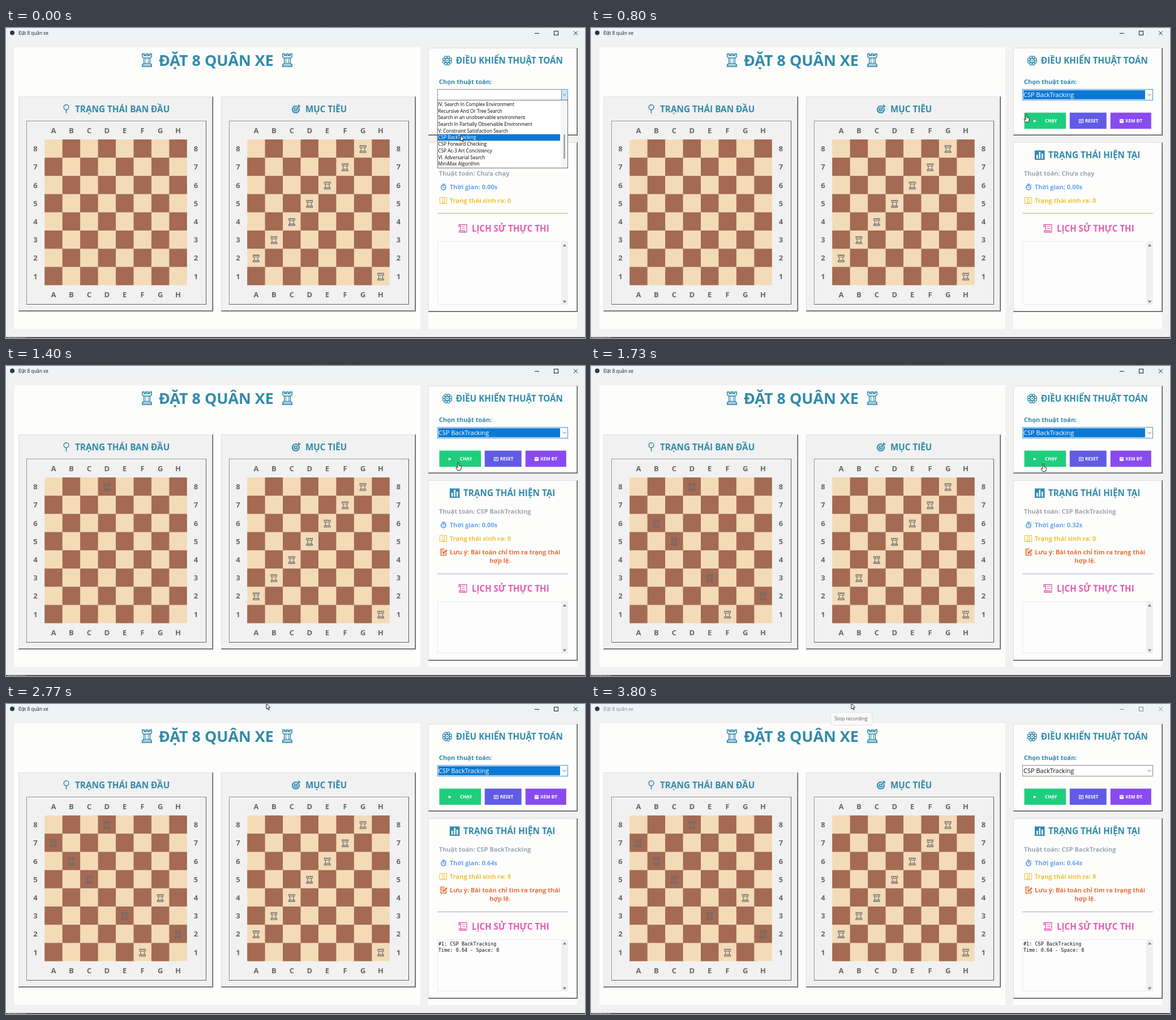
An HTML page with a canvas that plays this animation: 1023x548 px, repeating every 3830 ms.

```html
<!DOCTYPE html>
<html lang="vi">
<head>
<meta charset="utf-8">
<title>Đặt 8 quân xe</title>
<style>
  html, body { margin: 0; width: 100%; height: 100%; overflow: hidden; background: #f1f1f1; }
  canvas { display: block; }
</style>
</head>
<body>
<canvas id="stage" width="1023" height="548"></canvas>
<script>
const g = document.getElementById('stage').getContext('2d');
const LOOP = 3830;
const SANS = '"Open Sans", "Noto Sans", sans-serif';
const MONO = '"DejaVu Sans Mono", monospace';
const TEAL = '#318aac', GRAY = '#f1f1f1', WHITE = '#fdfdfc', PINK = '#e45cb0';

// Moments of the story, in ms
const PICK = 130, RUN = 1250, STEP = 80, DONE = RUN + 9 * STEP, BLUR = 3770;

// Column and row (from the top) in order of placing
const PLACED = [[3, 0], [1, 2], [2, 3], [4, 5], [7, 6], [5, 7], [0, 1], [6, 4]];
const GOAL = [[6, 0], [5, 1], [4, 2], [3, 3], [2, 4], [1, 5], [0, 6], [7, 7]];

// Pointer path: time, x, y
const PATH = [
  [0, 803, 190], [150, 803, 190], [430, 689, 125], [560, 688, 126], [900, 790, 160],
  [1100, 799, 167], [1250, 799, 167], [1500, 799, 173], [1950, 799, 173],
  [2270, 612, 66], [2620, 460, -1], [LOOP, 460, -1]
];

const OPTIONS = [
  'IV. Search In Complex Environment', 'Recursive And Or Tree Search',
  'Search in an unobservable environment', 'Search In Partially Observable Environment',
  'V. Constraint Satisfaction Search', 'CSP BackTracking', 'CSP Forward Checking',
  'CSP Ac-3 Art Concistency', 'VI. Adversarial Search', 'MiniMax Algorithm'
];

function rect(x, y, w, h, color) {
  g.fillStyle = color;
  g.fillRect(x, y, w, h);
}

function frame(x, y, w, h, color) {
  g.strokeStyle = color;
  g.lineWidth = 1;
  g.strokeRect(x + .5, y + .5, w - 1, h - 1);
}

// y is the middle of the capitals
function text(s, x, y, size, color, { weight = 700, align = 'left', font = SANS } = {}) {
  g.font = `${weight} ${size}px ${font}`;
  g.textAlign = align;
  g.fillStyle = color;
  g.fillText(s, x, y + size * .357);
}

function poly(points, close = true) {
  g.beginPath();
  points.forEach(([x, y]) => g.lineTo(x, y));
  if (close) g.closePath();
}

function line(points, color, width = 1) {
  poly(points, false);
  g.strokeStyle = color;
  g.lineWidth = width;
  g.stroke();
}

function ring(x, y, r, color, width) {
  g.beginPath();
  g.arc(x, y, r, 0, 7);
  g.strokeStyle = color;
  g.lineWidth = width;
  g.stroke();
}

function dot(x, y, r, color) {
  g.beginPath();
  g.arc(x, y, r, 0, 7);
  g.fillStyle = color;
  g.fill();
}

function triangle(x, y, r, dir, color) {
  poly([[x - r, y + r * .7 * dir], [x + r, y + r * .7 * dir], [x, y - r * .7 * dir]]);
  g.fillStyle = color;
  g.fill();
}

function raised(x, y, w, h, fill) {
  rect(x, y, w, h, fill);
  rect(x, y, w, 1, '#dedede');
  rect(x, y, 1, h, '#dedede');
  rect(x + w - 2, y + 1, 1, h - 1, '#a0a0a0');
  rect(x + 1, y + h - 2, w - 1, 1, '#a0a0a0');
  rect(x + w - 1, y, 1, h, '#505050');
  rect(x, y + h - 1, w, 1, '#505050');
}

function rook(x, y, scaleX, scaleY, color, width) {
  const half = [[1.2, -6.2], [1.2, -4.8], [3, -4.8], [3, -6.2], [5.3, -6.2], [5.3, -3.4],
    [3.4, -2], [3.4, 3], [5.3, 4.3], [5.3, 6.2]];
  const mirror = half.map(([a, b]) => [-a, b]).reverse();
  g.save();
  g.translate(x, y);
  g.scale(scaleX, scaleY);
  poly([...half, ...mirror]);
  g.strokeStyle = color;
  g.lineWidth = width;
  g.stroke();
  line([[-3.8, -2.2], [3.8, -2.2]], color, width * .9);
  line([[-3.8, 3.2], [3.8, 3.2]], color, width * .9);
  line([[-5, 4.8], [5, 4.8]], color, width * .6);
  g.restore();
}

function titleRook(x) {
  rook(x, 57, 1.55, 1.8, TEAL, 1);
  for (const side of [-1, 1]) line([[x + side * 2.3, 53], [x + side * 2.3, 63]], TEAL, 1);
  line([[x - 6, 49], [x + 6, 49]], TEAL, 1.2);
}

function board(x, rooks) {
  raised(x, 121, 344, 380, GRAY);
  frame(x + 15, 165, 317, 325, '#ffffff');
  frame(x + 14, 164, 318, 325, '#8c8c8c');
  rect(x + 331, 164, 1, 325, '#5a5a5a');
  rect(x + 14, 488, 318, 1, '#5a5a5a');
  const left = x + 46.2, top = 197, cw = 31.45, ch = 32.2;
  rect(left, top, cw * 8, ch * 8, '#f3dbb8');
  for (let r = 0; r < 8; r++) {
    for (let c = 1 - r % 2; c < 8; c += 2)
      rect(left + cw * c, top + ch * r, cw, ch, '#a46a54');
    const center = { align: 'center' };
    const mid = top + ch * (r + .5) + .5;
    text(8 - r, x + 30, mid, 13, '#666', center);
    text(8 - r, x + 313.5, mid, 13, '#666', center);
    for (const ly of [181.5, 471])
      text('ABCDEFGH'[r], left + cw * (r + .5), ly, 13, '#666', center);
  }
  for (const [c, r] of rooks)
    rook(left + cw * (c + .5), top + ch * (r + .5) + 1, 1, 1, '#6a6a6a', 1.1);
}

function titleBar(active) {
  const sky = g.createLinearGradient(0, 0, 1023, 0);
  sky.addColorStop(0, '#edf4f9');
  sky.addColorStop(1, '#e9f4f5');
  rect(0, 0, 1023, 20, sky);
  const ink = active ? '#1a1a1a' : '#858585';
  dot(11, 8.5, 4, '#2b3a48');
  text('Đặt 8 quân xe', 22, 9, 8.2, ink, { weight: 400 });
  line([[934, 9.5], [942, 9.5]], ink);
  frame(968, 5, 8, 8, ink);
  line([[1003, 5.5], [1010, 12.5]], ink);
  line([[1010, 5.5], [1003, 12.5]], ink);
}

function pinIcon() {
  ring(106.5, 140, 4.4, TEAL, 1.5);
  line([[106.5, 144.5], [106.5, 151]], TEAL, 1.6);
  line([[104.5, 138.8], [106, 137.4]], TEAL, 1);
}

function targetIcon() {
  ring(512, 144, 6, TEAL, 2.2);
  ring(512, 144, 2.6, TEAL, 2);
  line([[512, 144], [520, 136]], GRAY, 3.2);
  line([[512, 144], [519, 137]], TEAL, 1.8);
  line([[516.5, 140], [517, 136.5], [520, 139.5]], TEAL, 1.6);
}

function flowerIcon() {
  for (let i = 0; i < 8; i++) {
    const a = i * Math.PI / 4 + Math.PI / 8;
    ring(779.5 + 6.2 * Math.cos(a), 57.5 + 6.2 * Math.sin(a), 2.2, TEAL, 1.3);
  }
  ring(779.5, 57.5, 3.6, TEAL, 1.4);
  dot(779.5, 57.5, 1.2, TEAL);
}

function chartIcon() {
  rect(784, 216.5, 17.5, 16.5, TEAL);
  rect(787, 224, 2.5, 7, WHITE);
  rect(791.5, 219, 2.5, 12, WHITE);
  rect(796, 222, 2.5, 9, WHITE);
}

function watchIcon() {
  const c = '#66a3ec';
  ring(773, 282, 4, c, 2);
  line([[771, 276], [775, 276]], c, 1.8);
  line([[776.5, 278], [777.8, 276.7]], c, 1.6);
  line([[773, 279.5], [773, 282.5], [775, 282.5]], c, 1.2);
}

function digitsIcon() {
  const c = '#eec235';
  frame(766, 299, 13, 12, c);
  const o = { align: 'center' };
  text('12', 772.5, 302.6, 5.8, c, o);
  text('34', 772.5, 307.7, 5.8, c, o);
}

function memoIcon() {
  const c = '#e8713a';
  line([[775, 323.5], [768.5, 323.5], [768.5, 334.5], [777.5, 334.5], [777.5, 330]], c, 1.7);
  line([[770.5, 326.5], [774, 326.5]], c, 1.3);
  line([[770.5, 329], [773, 329]], c, 1.3);
  line([[772, 332], [779, 325]], c, 2.8);
}

function scrollIcon(y) {
  line([[803, y + 4], [803, y - 7], [814, y - 7], [814, y + 6]], PINK, 1.3);
  line([[803, y - 7], [800, y - 7], [800, y - 3.5], [803, y - 3.5]], PINK, 1.3);
  line([[814, y + 6.5], [801, y + 6.5], [801, y + 4], [811, y + 4], [811, y + 6.5]], PINK, 1.3);
  line([[805.5, y - 3.5], [811.5, y - 3.5]], PINK, 1);
  line([[805.5, y], [811.5, y]], PINK, 1);
}

function combo(open, active) {
  rect(762, 108, 231, 20, '#fff');
  frame(762, 108, 231, 20, active && !open ? '#3c94da' : '#8a8a8a');
  if (open) {
    rect(981, 108, 12, 20, '#cfe6f8');
    frame(981, 108, 12, 20, '#4d9ddb');
  } else {
    if (active) rect(764, 110, 215, 16, '#0b79d3');
    text('CSP BackTracking', 764, 118.5, 11, active ? '#fff' : '#111', { weight: 400 });
  }
  line([[983.5, 116.5], [986.5, 119.5], [989.5, 116.5]], '#666');
}

function dropdown() {
  rect(762, 128, 231, 120, '#fff');
  OPTIONS.forEach((name, i) => {
    const y = 135 + i * 11.7;
    const picked = i === 5;
    if (picked) rect(763, 187.7, 216, 11.6, '#0b79d3');
    text(name, 763.5, y, 8.28, picked ? '#fff' : '#000', { weight: 400 });
  });
  rect(980, 129, 12, 118, '#f5f5f5');
  rect(985.5, 188, 2, 43, '#858585');
  frame(762, 127, 231, 121, '#6e6e6e');
}

function buttons() {
  rect(765.6, 149.6, 73.6, 28.6, '#1fcd7d');
  rect(845.8, 149.6, 65, 28.6, '#625be5');
  rect(917.8, 149.6, 72, 28.6, '#894bef');
  poly([[782, 161.8], [782, 167], [787, 164.4]]);
  g.fillStyle = '#fff';
  g.fill();
  text('CHẠY', 802, 164.3, 8.1, '#fff');
  frame(862, 161, 8, 7, '#fff');
  rect(864, 163, 4, 1, '#fff');
  rect(864, 165, 3, 1, '#fff');
  text('RESET', 873, 164.3, 8, '#fff');
  rect(934, 161, 7, 7, '#fff');
  line([[935, 162.5], [937.5, 164.5], [940, 162.5]], '#894bef');
  text('XEM ĐT', 944, 164.3, 8.1, '#fff');
}

function controls(open, active) {
  raised(746, 35, 264, 155, WHITE);
  flowerIcon();
  text('ĐIỀU KHIỂN THUẬT TOÁN', 795, 58, 15.2, TEAL);
  text('Chọn thuật toán:', 765, 95.5, 11, TEAL);
  combo(open, active);
  buttons();
}

function status(t) {
  const running = t >= RUN, done = t >= DONE;
  const steps = Math.max(0, Math.floor((t - RUN) / STEP) - 2);
  const secs = done ? '0.64' : (steps * .08).toFixed(2);
  const shift = running ? 39 : 0;

  raised(746, 202, 264, running ? 319 : 300, WHITE);
  chartIcon();
  text('TRẠNG THÁI HIỆN TẠI', 808, 225, 15.3, TEAL);
  text('Thuật toán: ' + (running ? 'CSP BackTracking' : 'Chưa chạy'), 765, 257, 11, '#9ca6b2');
  watchIcon();
  text(`Thời gian: ${secs}s`, 784, 281, 11, '#66a3ec');
  digitsIcon();
  text('Trạng thái sinh ra: ' + (done ? 8 : 0), 784, 305, 11, '#eec235');
  if (running) {
    memoIcon();
    text('Lưu ý: Bài toán chỉ tìm ra trạng thái', 784, 329, 11, '#e8713a');
    text('hợp lệ.', 873, 344.5, 11, '#e8713a', { align: 'center' });
  }
  rect(762, running ? 367 : 327, 231, 1, running ? '#a9a5cc' : '#b3ab74');
  scrollIcon(354.5 + shift);
  text('LỊCH SỬ THỰC THI', 823, 354.7 + shift, 15.1, PINK);
  history(377 + shift, running ? 508 : 489, done);
}

function history(top, bottom, done) {
  rect(762, top, 231, bottom - top, '#fdfdfe');
  frame(762, top, 231, bottom - top, '#e9e9f1');
  rect(981, top, 12, bottom - top, '#f0f0f0');
  triangle(987, top + 7, 3.3, 1, '#858585');
  triangle(987, bottom - 5, 3.3, -1, '#858585');
  if (!done) return;
  const style = { weight: 400, font: MONO };
  text('#1: CSP BackTracking', 764, top + 7.5, 8.5, '#111', style);
  text('Time: 0.64 - Space: 8', 764, top + 18.5, 8.5, '#111', style);
}

function pointer(t) {
  const i = PATH.findIndex(p => p[0] > t);
  const [t0, x0, y0] = PATH[i - 1], [t1, x1, y1] = PATH[i];
  const k = (t - t0) / (t1 - t0), e = k * k * (3 - 2 * k);
  const x = x0 + (x1 - x0) * e, y = y0 + (y1 - y0) * e;
  const hand = t > PICK && x > 766 && x < 839 && y > 150 && y < 178;
  g.save();
  g.translate(x, y);
  if (hand) {
    poly([[-1, 0], [1, 0], [1.2, 5], [5, 6], [5.5, 9], [4, 13.5], [-1, 13.5], [-4, 9], [-3, 7.5], [-1, 9]]);
  } else {
    poly([[0, 0], [0, 10], [2.2, 8], [3.8, 11.4], [5.2, 10.8], [3.7, 7.4], [6.6, 7.2]]);
  }
  g.fillStyle = '#fff';
  g.fill();
  g.strokeStyle = '#222';
  g.lineWidth = 1;
  g.lineJoin = 'round';
  g.stroke();
  g.restore();
}

function tooltip() {
  g.beginPath();
  g.roundRect(423.5, 14.5, 73, 23, 3);
  g.fillStyle = '#f9f9f9';
  g.fill();
  g.strokeStyle = '#e0e0e0';
  g.lineWidth = 1;
  g.stroke();
  text('Stop recording', 430, 26, 8.6, '#606060', { weight: 400 });
}

// Window's lower edge, with the tops of a caption hidden below it
function bottomEdge() {
  rect(0, 546, 1023, 1, '#8a8a8a');
  rect(0, 547, 1023, 1, '#2a2a2a');
  text('Terminal', 2, 548, 8, '#d8d8d8', { weight: 400 });
}

function draw(t) {
  const open = t < PICK, active = t < BLUR;
  const count = Math.max(0, Math.min(8, Math.floor((t - RUN) / STEP)));

  rect(0, 0, 1023, 548, GRAY);
  titleBar(active);
  rect(15, 34, 717, 498, WHITE);
  rect(746, 35, 263, 497, WHITE);
  rect(746, 190, 263, 12, GRAY);

  titleRook(249);
  text('ĐẶT 8 QUÂN XE', 270, 57.5, 26.9, TEAL);
  titleRook(497);

  board(22, PLACED.slice(0, count));
  board(380, GOAL);
  pinIcon();
  text('TRẠNG THÁI BAN ĐẦU', 122, 143.5, 15.3, TEAL);
  targetIcon();
  text('MỤC TIÊU', 529, 143.5, 15.2, TEAL);

  controls(open, active);
  status(t);
  if (open) dropdown();
  bottomEdge();
  if (!active) tooltip();
  pointer(t);
}

function tick() {
  draw(performance.now() % LOOP);
  requestAnimationFrame(tick);
}
tick();
</script>
</body>
</html>
```
